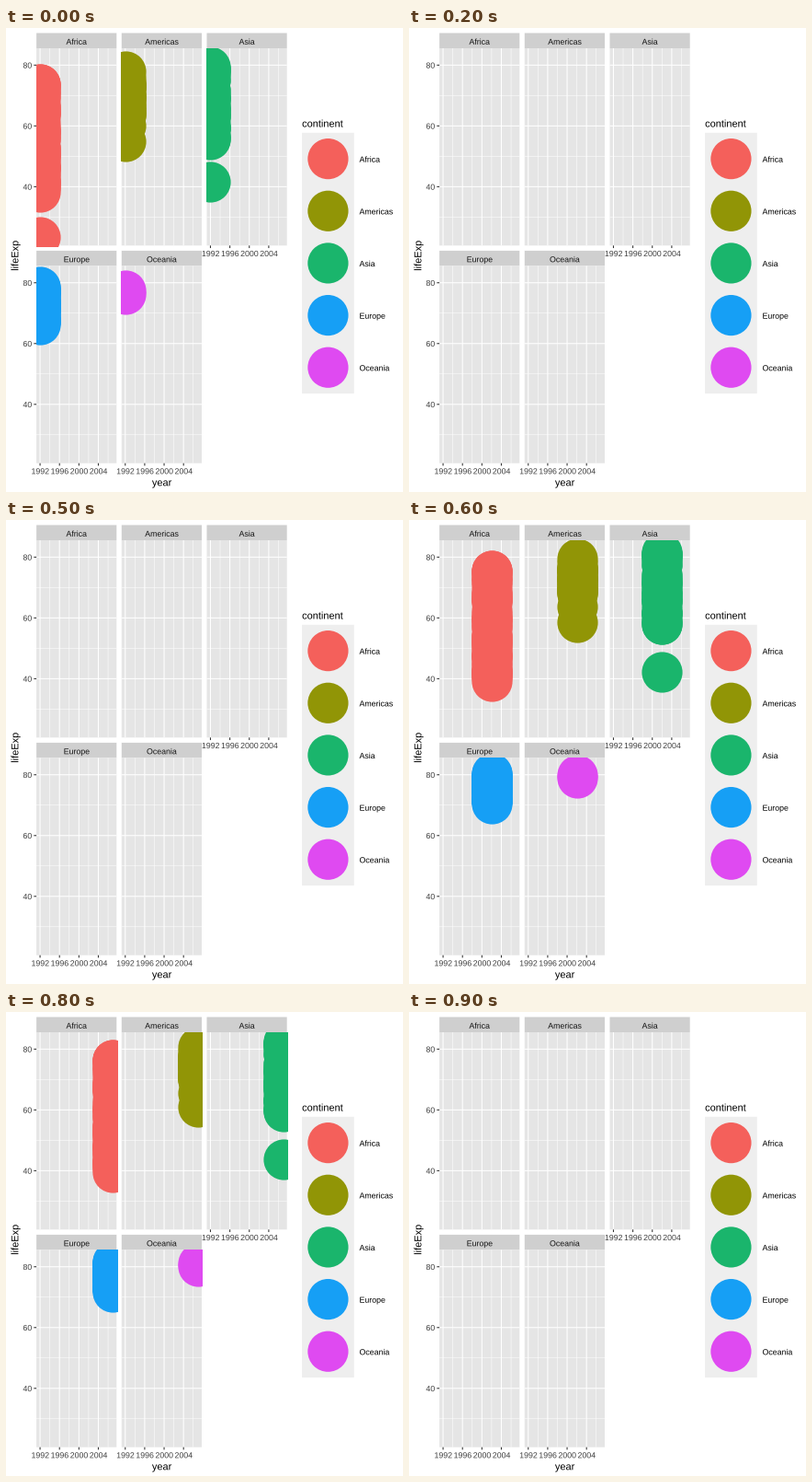
These frames come from a looping animation (432 by 504 pixels, 1000 ms). A matplotlib script:

```python
import math

import numpy as np
import matplotlib.pyplot as plt
from matplotlib.animation import FuncAnimation
from matplotlib.patches import Circle, PathPatch, Rectangle
from matplotlib.textpath import TextPath
from matplotlib.transforms import Affine2D

plt.rcParams.update({"font.family": "Liberation Sans", "path.snap": False})

W, H, DPI = 432, 504, 72
PANEL_W, PANEL_H = 87.2, 214.3
LEFTS = (33.1, 125.8, 218.5)
TOPS = (22.0, 258.4)
STRIP_H = 16.5
FIRST, LAST = 1992, 2007
X_MIN, X_MAX = 1991.25, 2007.75
Y_MIN, Y_MAX = 20.64, 85.55
RADIUS = 22.1

PANEL, STRIP, KEY = "#E5E5E5", "#CFCFCF", "#EEEEEE"
TICK, AXIS_TEXT, STRIP_TEXT = "#333333", "#404040", "#141414"


class Continent:
    """A bulk of countries between two trends, plus a few stragglers.

    A trend is (first value, last value, bend); bend 1 is a straight line.
    """

    def __init__(self, color, count, low, high, stragglers=()):
        self.color = color
        self.low, self.high, self.stragglers = low, high, stragglers
        spread = np.random.default_rng(count).uniform(0, 1, count - 2)
        self.ranks = np.concatenate(([0, 1], spread))

    def life(self, year):
        low, high = trend(self.low, year), trend(self.high, year)
        alone = [trend(s, year) for s in self.stragglers]
        return np.concatenate((low + (high - low) * self.ranks, alone))


def trend(curve, year):
    start, end, bend = curve
    return start + (end - start) * ((year - FIRST) / (LAST - FIRST)) ** bend


CONTINENTS = {
    "Africa": Continent("#F4605B", 51, (38.3, 39.6, 1), (73.6, 76.4, 0.8),
                        [(23.6, 46.2, 0.54)]),
    "Americas": Continent("#919506", 23, (63.4, 69.8, 0.8), (77.95, 80.65, 1.3),
                          [(55.1, 60.9, 1.2), (60.0, 65.6, 0.9)]),
    "Asia": Continent("#1AB56C", 32, (55.6, 59.5, 1.3), (79.4, 82.6, 0.8),
                      [(41.7, 43.8, 3)]),
    "Europe": Continent("#169FF5", 30, (66.15, 71.8, 0.7), (78.8, 81.8, 1.5)),
    "Oceania": Continent("#DF4AF1", 2, (76.33, 80.2, 1), (77.56, 81.2, 1)),
}

# Year on show at each tenth of the loop; the panels are empty otherwise.
SCHEDULE = {0: 1992, 1: 1992, 3: 1997, 4: 1997, 6: 2002, 8: 2007}

fig = plt.figure(figsize=(W / DPI, H / DPI), dpi=DPI, facecolor="white")
ax = fig.add_axes([0, 0, 1, 1])
ax.set_xlim(0, W)
ax.set_ylim(H, 0)
ax.axis("off")


def px(left, year):
    return left + (year - X_MIN) / (X_MAX - X_MIN) * PANEL_W


def py(top, value):
    return top + (Y_MAX - value) / (Y_MAX - Y_MIN) * PANEL_H


def rect(x, y, w, h, color):
    ax.add_patch(Rectangle((x, y), w, h, fc=color, lw=0, zorder=1))


def line(xs, ys, color, width):
    ax.plot(xs, ys, color=color, lw=width, solid_capstyle="butt", zorder=2)


def label(x, baseline, text, size=8.8, color="black", align=0.5, angle=0):
    """Draw text as outlines; align 0, 0.5 or 1 is left, centre or right."""
    path = TextPath((0, 0), text, size=size)
    place = (Affine2D().translate(-align * path.get_extents().x1, 0)
             .scale(1, -1).rotate_deg(-angle).translate(x, baseline))
    ax.add_patch(PathPatch(place.transform_path(path), fc=color, lw=0, zorder=5))


def pixel_box(left, top):
    """Panel area grown outward to whole pixels, used for clipping."""
    x, y = math.floor(left), math.floor(top)
    right, bottom = math.ceil(left + PANEL_W), math.ceil(top + PANEL_H)
    return Rectangle((x, y), right - x, bottom - y, transform=ax.transData)


def draw_panel(left, top, name):
    """Draw strip, background and grid; return the empty point layer."""
    rect(left, top - STRIP_H, PANEL_W, STRIP_H, STRIP)
    label(left + PANEL_W / 2, top - 4.1, name, color=STRIP_TEXT)
    rect(left, top, PANEL_W, PANEL_H, PANEL)
    for first_year, first_value, width in ((1994, 30, 0.53), (1992, 40, 1.07)):
        for value in range(first_value, 81, 20):
            y = py(top, value)
            line((left, left + PANEL_W), (y, y), "white", width)
        for year in range(first_year, LAST, 4):
            x = px(left, year)
            line((x, x), (top, top + PANEL_H), "white", width)
    dots = ax.scatter([], [], s=(2 * RADIUS) ** 2, linewidths=0, zorder=3,
                      color=CONTINENTS[name].color)
    dots.set_clip_path(pixel_box(left, top))
    return dots


def draw_x_axis(left, top):
    bottom = top + PANEL_H
    for year in range(1992, 2005, 4):
        x = px(left, year)
        line((x, x), (bottom, bottom + 2.75), TICK, 1.07)
        label(x, bottom + 11.7, str(year), color=AXIS_TEXT)


def draw_y_axis(left, top):
    for value in (40, 60, 80):
        y = py(top, value)
        line((left - 2.75, left), (y, y), TICK, 1.07)
        label(left - 5.2, y + 3.3, str(value), color=AXIS_TEXT, align=1)


def draw_legend():
    x, y, key = 322.1, 113.8, 56.65
    label(x, 107.5, "continent", size=11, align=0)
    rect(x, y, key, key * len(CONTINENTS), KEY)
    for i, (name, continent) in enumerate(CONTINENTS.items()):
        cy = y + (i + 0.5) * key
        ax.add_patch(Circle((x + key / 2, cy), RADIUS, fc=continent.color,
                            lw=0, zorder=3))
        label(384.5, cy + 3.6, name, align=0)


layers = []
for i, name in enumerate(CONTINENTS):
    left, top = LEFTS[i % 3], TOPS[i // 3]
    layers.append((CONTINENTS[name], left, top, draw_panel(left, top, name)))

for top in TOPS:
    draw_y_axis(LEFTS[0], top)
for left, top in ((LEFTS[0], TOPS[1]), (LEFTS[1], TOPS[1]), (LEFTS[2], TOPS[0])):
    draw_x_axis(left, top)

label(169.5, 497.3, "year", size=11)
label(13.4, 247.5, "lifeExp", size=11, angle=90)
draw_legend()


def update(frame):
    year = SCHEDULE.get(frame)
    for continent, left, top, dots in layers:
        points = np.empty((0, 2))
        if year:
            ys = py(top, continent.life(year))
            points = np.column_stack((np.full_like(ys, px(left, year)), ys))
        dots.set_offsets(points)
    return [layer[-1] for layer in layers]


anim = FuncAnimation(fig, update, frames=10, interval=100,
                     repeat=True, repeat_delay=0)
plt.show()
```
